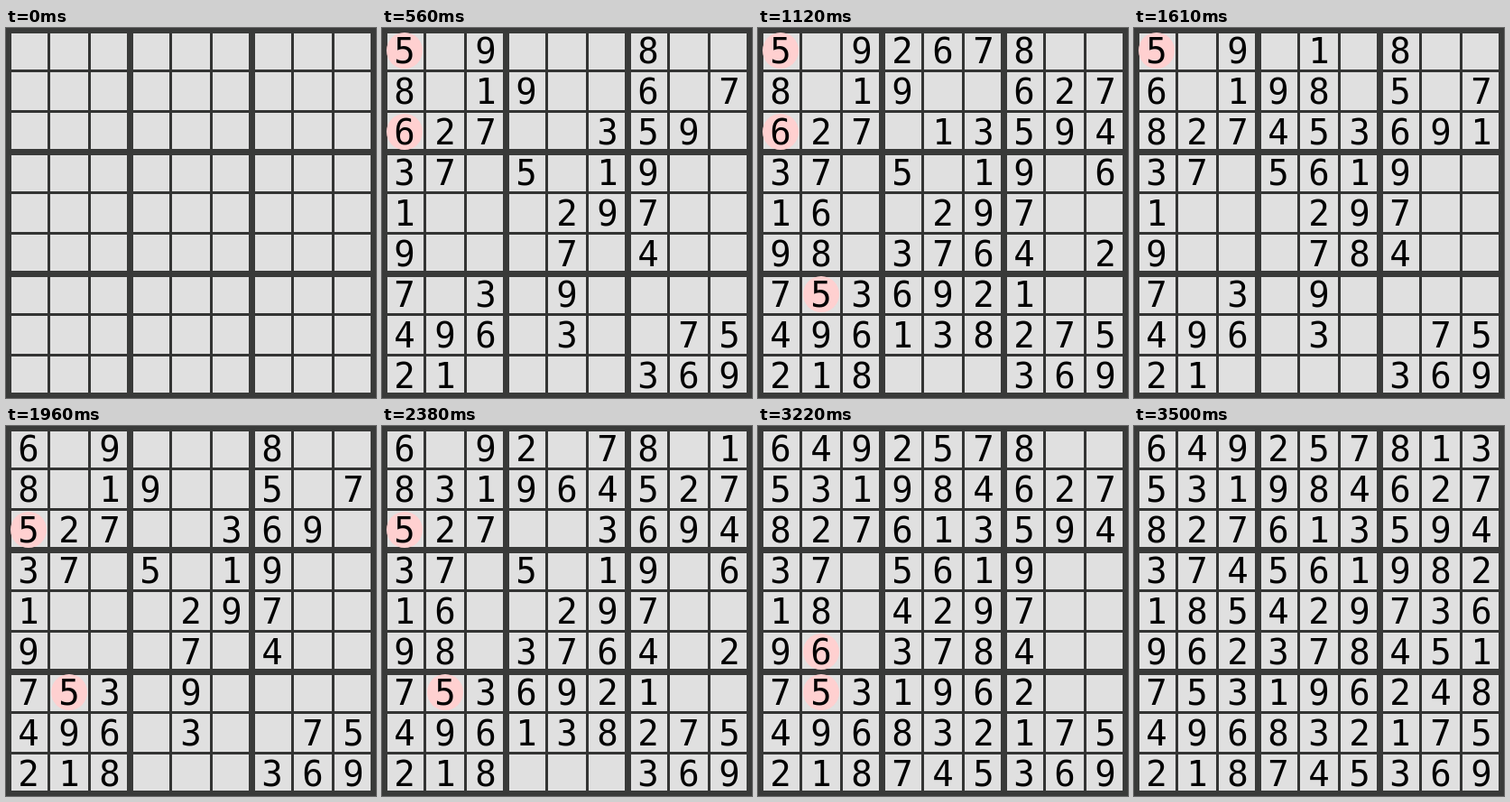
These frames come from a looping animation (410 by 410 pixels, 4970 ms). An HTML page with a canvas:

```html
<!DOCTYPE html>
<html lang="en">
<head>
<meta charset="utf-8">
<title>Sudoku solver</title>
<style>
  html, body { margin: 0; width: 100%; height: 100%; overflow: hidden; background: #393a39; }
  canvas { display: block; }
</style>
</head>
<body>
<canvas id="board" width="410" height="410"></canvas>
<script>
const LOOP = 4970, BLANK = 280, STEP = 70, PITCH = 45;
const ctx = document.getElementById("board").getContext("2d");

const givens = [
  "..9...8..", "..19....7", ".27..3.9.",
  "37.5.19..", "1...297..", "9...7.4..",
  "7.3.9....", "496.3..75", "21....369"
];

// A move is column, row, digit. "?" marks a guess, "^" takes the last guess back.
const lowerHalf = (extraA, extraB) => [
  "b75?", "c98", "b66?", "b58 f68", "d63 d88 d71",
  "^ b68 b56 f66",
  "d63 d76 i46 " + extraA,
  "d12 f17 h22 i34 i62 f72 g71 d81 f88 g82 " + extraB
];

const steps = [
  "a15?", "a36?", "a28 g26", "g35",
  ...lowerHalf("e16", "e31"),
  "d38 e48 d54 d97",
  "^ b78", "c95", "b65?",
  "^ ^ a38 a26", "g25 g36 e28", "e11 d34 e35 i31 e46 f68",
  "^ a16", "a35?", "a28 g25 g36",
  ...lowerHalf("e26", "b23 f24 i11"),
  "d54 e48 d97",
  "^ ^ a38 a25", "g35 g26", "b75?", "c98", "b66?",
  "b58 f68 e28 d12 d63 d71 f76 d88",
  "g81 f17 h22 f82", "d97 e15 f24 g72", "e94 f95 b23",
  "b14 e46 d54", "d36 e31 i34", "c44 c55 c62",
  "i78 h74 i42 h48", "h53 i56 h11 i13", "h65 i61"
];

function buildStates() {
  let cells = new Map();
  givens.forEach((line, row) => [...line].forEach((digit, col) => {
    if (digit !== ".") cells.set("abcdefghi"[col] + (row + 1), { digit });
  }));
  const states = [new Map(), new Map(cells)];
  const undo = [];
  for (const step of steps) {
    for (const move of step.split(" ").filter(Boolean)) {
      if (move === "^") { cells = undo.pop(); continue; }
      const guess = move.endsWith("?");
      if (guess) undo.push(new Map(cells));
      cells.set(move.slice(0, 2), { digit: move[2], guess });
    }
    states.push(new Map(cells));
  }
  return states;
}

function drawGrid() {
  ctx.fillStyle = "#e0e0e0";
  ctx.fillRect(0, 0, 410, 410);
  for (let i = 0; i <= 9; i++) {
    const thick = i % 3 === 0;
    const width = thick ? 7 : 3;
    const start = 2.5 + PITCH * i - width / 2;
    ctx.fillStyle = thick ? "#393a39" : "#333433";
    ctx.fillRect(start, 0, width, 410);
    ctx.fillRect(0, start, 410, width);
  }
  // Thick lines run unbroken over the thin ones.
  ctx.fillStyle = "#393a39";
  for (let i = 0; i <= 9; i += 3) {
    ctx.fillRect(PITCH * i - 1, 0, 7, 410);
    ctx.fillRect(0, PITCH * i - 1, 410, 7);
  }
}

function drawCells(cells) {
  const solved = cells.size === 81;
  ctx.font = '39px "DejaVu Sans Mono", monospace';
  ctx.textAlign = "center";
  for (const [place, { digit, guess }] of cells) {
    const x = 25 + PITCH * "abcdefghi".indexOf(place[0]);
    const y = 25 + PITCH * (place[1] - 1);
    if (guess && !solved) {
      ctx.fillStyle = "#ffd0d0";
      ctx.beginPath();
      ctx.arc(x, y, 20, 0, 2 * Math.PI);
      ctx.fill();
    }
    ctx.fillStyle = "#000";
    ctx.fillText(digit, x, y + 14.2);
  }
}

const states = buildStates();

function frame() {
  const time = performance.now() % LOOP;
  const index = Math.floor((time - BLANK) / STEP) + 1;
  drawGrid();
  drawCells(states[Math.max(0, Math.min(index, states.length - 1))]);
  requestAnimationFrame(frame);
}
frame();
</script>
</body>
</html>
```
